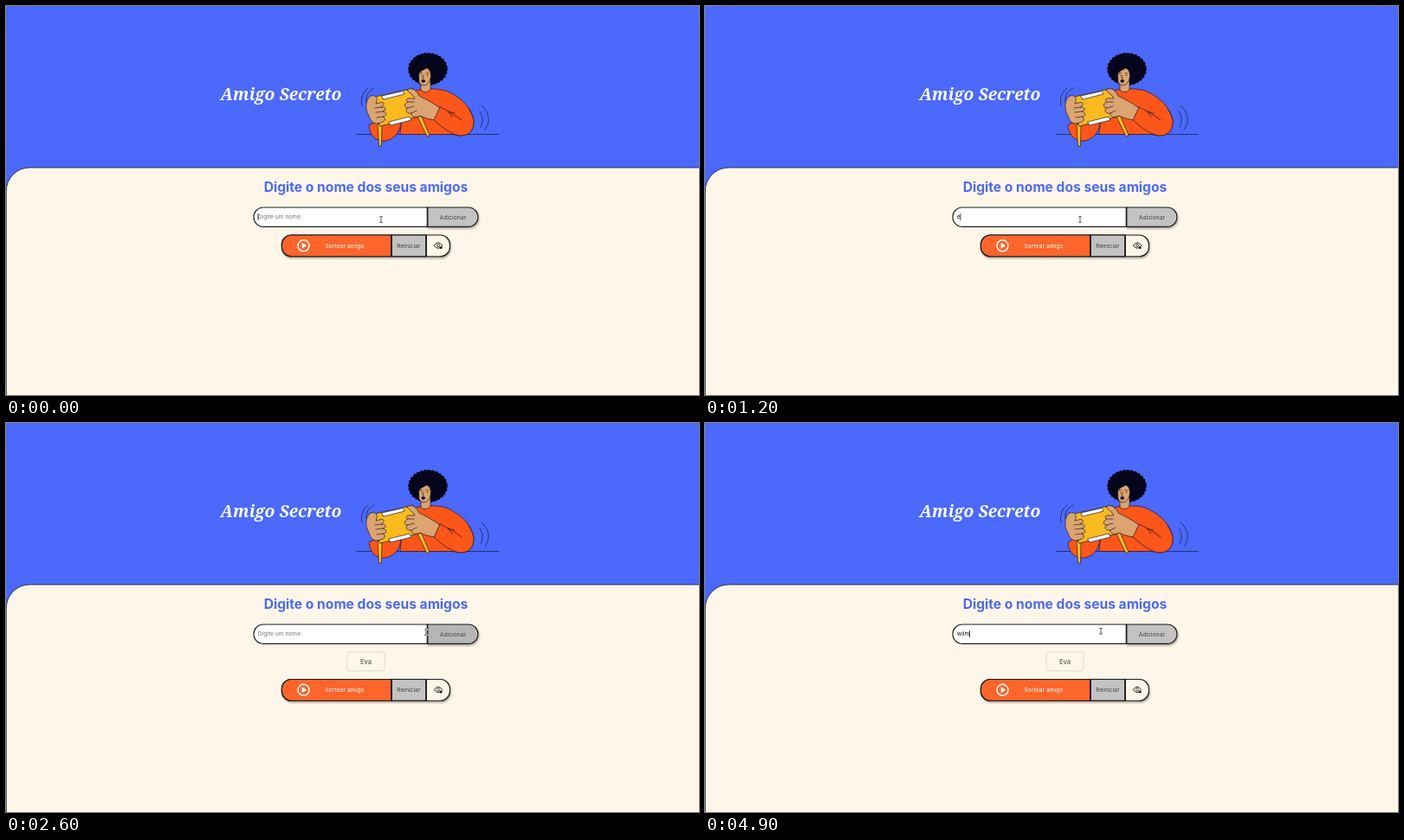
An HTML page that plays this animation: 800x450 px, repeating every 5000 ms.

```html
<!DOCTYPE html>
<html lang="pt-BR">
<head>
<meta charset="utf-8">
<title>Amigo Secreto</title>
<style>
html, body { margin: 0; width: 100%; height: 100%; overflow: hidden; background: #4b69fd; }
svg { display: block; width: 100vw; height: 100vh; }
text { font-family: Inter, sans-serif; font-size: 6.75px; fill: #444; }
.mid { text-anchor: middle; }
.title { font: italic 700 19.2px "Noto Serif", serif; fill: #fff; }
.heading { font-size: 15.6px; font-weight: 700; fill: #4b69fd; }
.box { stroke: #1c1c1c; stroke-width: 1.15; }
.art { stroke: #14142b; stroke-width: .65; stroke-linejoin: round; stroke-linecap: round; fill: none; }
.skin { fill: #dba470; }
.orange { fill: #fd5619; }
.yellow { fill: #fbba1e; }
.white { fill: #fff; }
.hair { fill: #05051c; stroke: #05051c; }
</style>
</head>
<body>
<svg viewBox="0 0 800 450">
  <defs>
    <filter id="shade" x="-10%" y="-30%" width="120%" height="180%">
      <feDropShadow dx=".8" dy="1.7" stdDeviation="1" flood-opacity=".35"/>
    </filter>
  </defs>
  <rect width="800" height="450" fill="#4b69fd"/>
  <text class="mid title" x="317.5" y="109.3">Amigo Secreto</text>

  <g class="art">
    <path d="M405 148.5H569"/>
    <path d="M411 115C409 107 412 99 418 95M416 111C415 104 418 98 425 95"/>
    <path d="M547 122C551 128 551 134 548 140M549 115C559 124 559 135 553 143"/>
    <!-- torso and far sleeve -->
    <path class="orange" d="M473 98C480 95 499 95 508 98C525 105 538 118 540 133C540 144 535 150 524 150L515 148.5H455C456 128 463 105 473 98Z"/>
    <path class="orange" d="M419 138C420 151 428 157 438 156C449 154 455 145 456 135L438 130Z"/>
    <!-- head -->
    <ellipse class="hair" cx="487" cy="73" rx="20" ry="17"/>
    <ellipse class="hair" cx="487" cy="73" rx="20.4" ry="16.6" stroke-width="5" stroke-dasharray="0 4.2"/>
    <path class="skin" d="M479 89V97C481 100.5 488 100.5 490 96V85Z"/>
    <path class="skin" d="M476.5 80C477 75 481 75 485 72C490 72 492 80 489 87C486 93 479 93.5 477 88Z"/>
    <path d="M478 78l2.3-.6M485 77.5l2.7.8M482 80l-1.2 3.4h1.4"/>
    <path d="M479.6 80v.1M486.3 80.2v.1" stroke-width="1.2"/>
    <ellipse cx="481.7" cy="86.8" rx="1.9" ry="1.7" fill="#14142b"/>
    <!-- parcel -->
    <path class="yellow" d="M429 137L430.5 162L433.5 162L434 136Z"/>
    <path class="yellow" d="M475 128L486 151L489 149.5L479 126Z"/>
    <path class="yellow" d="M422 106L470 95L480 127L432 139Z"/>
    <path class="white" d="M434 104L458 98.5L460 102L436 108Z"/>
    <path class="white" d="M442 134L466 128L468 132L444 138Z"/>
    <!-- hands -->
    <path class="skin" d="M421 104C415 108 414 119 419 127C421 134 425 138 432 135C438 134 439 130 435 128C440 128 440 123 435 122C440 121 439 116 433 117C438 114 437 110 431 112L427 113C430 107 427 102 421 104Z"/>
    <path d="M435 128L428 129M435 122L427 123M433 117L426 118"/>
    <path class="skin" d="M463 97C469 93 474 98 477 104C485 108 493 112 501 118L495 132C488 131 482 129 478 127C472 130 467 128 468 124C462 125 460 120 464 118C459 118 459 113 464 111C460 109 463 106 468 107L472 107C470 102 465 101 463 97Z"/>
    <path d="M464 111L471 111M464 118L471 116M468 124L474 121"/>
    <!-- near sleeve -->
    <path class="orange" d="M501 117L494 132C504 141 515 149 524 150C535 150 540 144 540 133C539 128 537 123 534 119"/>
    <path d="M501 117C510 121 518 126 526 132M510 122L518 124M511 123L515 128"/>
  </g>

  <rect x=".3" y="187" width="900" height="400" rx="27" fill="#fef7e9" stroke="#151525" stroke-width=".75"/>
  <text class="mid heading" x="415.5" y="215.4">Digite o nome dos seus amigos</text>

  <g filter="url(#shade)">
    <path id="add" class="box" d="M486.5 233H533.7a11.2 11.2 0 0 1 0 22.4H486.5Z"/>
  </g>
  <path class="box" fill="#fff" d="M486.5 233H297.2a11.2 11.2 0 0 0 0 22.4H486.5Z"/>
  <path d="M486.5 233V255.4" stroke="#1c1c1c" stroke-width="1.6"/>
  <text class="mid" x="516" y="246.5">Adicionar</text>
  <text id="field" x="290.8" y="246.3" style="font-size:6.67px"></text>
  <rect id="caret" y="240" width=".8" height="8" fill="#111"/>

  <g id="chip">
    <rect x="394" y="264.8" width="43" height="22" rx="3" fill="#fef7e9" stroke="#e0dacb" stroke-width="1"/>
    <text class="mid" x="415.5" y="278.6" style="font-size:7.7px">Eva</text>
  </g>

  <g id="row">
    <g filter="url(#shade)">
      <rect class="box" x="318.4" y="265" width="194" height="24.7" rx="11" fill="#fef7e9"/>
    </g>
    <path class="box" fill="#fe652b" d="M445 265H329.4a11 11 0 0 0-11 11V278.7a11 11 0 0 0 11 11H445Z"/>
    <rect class="box" x="445" y="265" width="40" height="24.7" fill="#c3c3c3"/>
    <path d="M445 265V289.7M485 265V289.7" stroke="#1c1c1c" stroke-width="1.7"/>
    <circle cx="343.5" cy="277.3" r="6.5" fill="none" stroke="#fff" stroke-width="1.5"/>
    <path class="white" d="M341.6 273.8L347.2 277.3L341.6 280.8Z"/>
    <text class="mid" x="391" y="279.8" style="fill:#fff">Sortear amigo</text>
    <text class="mid" x="464.8" y="279.8">Reiniciar</text>
    <path d="M494.2 277Q499 270.4 503.8 277Q499 283.6 494.2 277Z" fill="none" stroke="#222" stroke-width=".95"/>
    <circle cx="499" cy="277" r="1.6" fill="none" stroke="#222" stroke-width=".8"/>
    <circle cx="502.2" cy="279.6" r="1.5" fill="#222"/>
  </g>

  <g id="beam" fill="none" stroke-linecap="round">
    <path d="M-1.6-3.2H1.6M0-3.2V3.2M-1.6 3.2H1.6" stroke="#fff" stroke-width="2"/>
    <path d="M-1.6-3.2H1.6M0-3.2V3.2M-1.6 3.2H1.6" stroke="#555" stroke-width=".9"/>
  </g>
  <path id="hand" d="M-1.6-3.2C-.8-3.6-.3-3-.2-1.2L2.6-.5C3.6 0 3.2 1.8 2.6 3.2H-1.2L-3 .6C-2.8-.1-2.1 0-1.6.6Z" fill="#0c0c0c"/>
</svg>
<script>
const LOOP = 5000;
const $ = id => document.getElementById(id);

// [time, text]
const typing = [[0, ""], [1100, "e"], [1250, "ev"], [1400, "eva"], [2100, ""],
  [3800, "w"], [4000, "wi"], [4400, "wil"], [4700, "wilm"]];
// [time, x, y]
const mouse = [[0, 433, 247], [1500, 433, 247], [1700, 486, 241], [1950, 513, 243.5],
  [2400, 513, 243.5], [2800, 457, 240.7], [LOOP, 457, 240.7]];
// [time, darkness]
const hover = [[0, 0], [1800, 0], [1950, 1], [2480, 1], [2680, 0], [LOOP, 0]];
const ADDED = 2100, BLUR = 2050, FOCUS = 2950, BLINK = 500;
const blinkStarts = [-200, 800, FOCUS, ...typing.slice(1).map(s => s[0])].sort((a, b) => a - b);

const ease = p => p * p * (3 - 2 * p);

function tween(keys, t) {
  const i = Math.max(1, keys.findIndex(k => k[0] > t));
  const a = keys[i - 1], b = keys[i];
  const p = ease((t - a[0]) / (b[0] - a[0]));
  return a.slice(1).map((v, n) => v + (b[n + 1] - v) * p);
}

function show(el, on) {
  el.setAttribute("visibility", on ? "visible" : "hidden");
}

function draw(t) {
  const word = typing.filter(s => s[0] <= t).pop()[1];
  const field = $("field"), caret = $("caret");
  const label = word || "Digite um nome";
  if (field.textContent !== label) field.textContent = label;
  field.style.fill = word ? "#111" : "#757575";

  const since = t - blinkStarts.filter(s => s <= t).pop();
  const focused = t < BLUR || t >= FOCUS;
  show(caret, focused && since % (2 * BLINK) < BLINK);
  caret.setAttribute("x", 290.6 + (word ? field.getComputedTextLength() : 0));

  const added = t >= ADDED;
  show($("chip"), added);
  $("row").setAttribute("transform", `translate(0 ${added ? 31.5 : 0})`);

  const grey = Math.round(195 - 38 * tween(hover, t)[0]);
  $("add").setAttribute("fill", `rgb(${grey},${grey},${grey})`);

  const [x, y] = tween(mouse, t);
  const over = x > 487;
  for (const id of ["beam", "hand"]) {
    $(id).setAttribute("transform", `translate(${x} ${y})`);
    show($(id), over === (id === "hand"));
  }
}

const start = performance.now();
function frame() {
  draw((performance.now() - start) % LOOP);
  requestAnimationFrame(frame);
}
frame();
</script>
</body>
</html>
```
